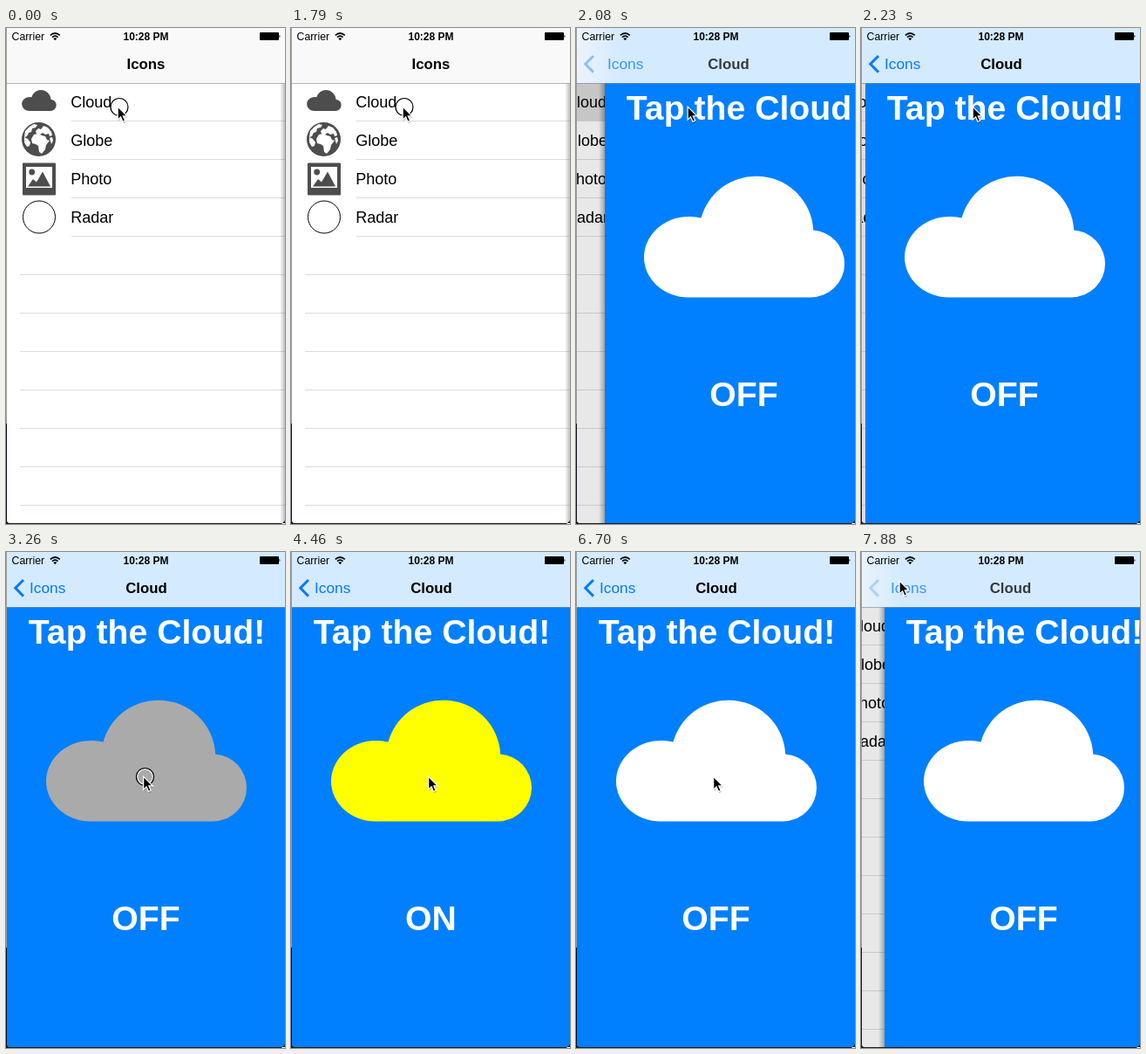
An HTML page that plays this animation: 320x568 px, repeating every 8 s.

```html
<!DOCTYPE html>
<html lang="en">
<head>
<meta charset="utf-8">
<title>Icons</title>
<style>
  html, body { margin: 0; width: 100%; height: 100%; overflow: hidden; background: #fff; }
  svg { display: block; width: 320px; height: 568px; }
  text { font-family: "Liberation Sans", Arial, sans-serif; }
  .row { font-size: 18px; }
  .bar { font-size: 17.3px; }
  .bold { font-size: 16.8px; font-weight: bold; }
  .big { font-size: 39.2px; font-weight: bold; fill: #fff; text-anchor: middle; }
</style>
</head>
<body>
<svg viewBox="0 0 320 568" xmlns="http://www.w3.org/2000/svg">
  <defs>
    <clipPath id="phone"><rect x="1" width="319" height="567"/></clipPath>
    <linearGradient id="tint" gradientUnits="userSpaceOnUse">
      <stop stop-color="#f9f9f9"/><stop offset="1" stop-color="#d4eaff"/>
    </linearGradient>
    <linearGradient id="shade">
      <stop stop-opacity="0"/><stop offset="1" stop-opacity=".3"/>
    </linearGradient>
    <path id="cloud" d="M97 308.500H237A39 38.500 0 0 0 276 270A39 38.500 0 0 0 240.200 231.500A65.300 65.300 0 0 0 175 169.700A65.300 65.300 0 0 0 111.500 217.500A52 46.500 0 0 0 46 262.500A51 46 0 0 0 97 308.500Z"/>
    <path id="arrow" d="M1 1V14.400L4.100 11.500L6.200 16.300L8.600 15.200L6.500 10.600H10.600Z"/>
  </defs>

  <g clip-path="url(#phone)">
    <rect width="320" height="568" fill="#fff"/>

    <g id="list">
      <rect id="mark" y="63" width="420" height="44" fill="#d9d9d9"/>
      <g id="lines" stroke="#dcdcde"/>
      <g id="names"></g>
      <g fill="#4d4d4d">
        <use href="#cloud" transform="translate(10.2 41.9) scale(.172)"/>
        <circle cx="37.5" cy="127.5" r="19.5"/>
        <path fill="#fff" d="M22 118l5-5 5-3 4 1-2 3-4 1-1 4-3 1-2 4-3 1zM34 118l3-3 3 1 3-4 5 2 4 5 1 4-3 1-1-3-4 1-3-2-3 2-4-1zM32 122l5-1 4 2 4 1 2 4 3 1-4 5-1 5-4 5-3-2-1-7-3-2-4-1-1-5zM21 125l4 2 3 4-1 4-3 1-3-5zM50 126l3-1 1 4-2 4z"/>
        <rect x="19" y="154.5" width="38" height="37" rx="1"/>
        <rect x="23" y="159" width="30" height="24" fill="#fff"/>
        <circle cx="29.7" cy="165" r="3.4"/>
        <path d="M25 181.5L31 173L35 176.5L42 164.5L51 181.5Z"/>
        <circle cx="38" cy="216.5" r="18.5" fill="#fff" stroke="#000"/>
      </g>
    </g>
    <rect id="dim" y="63" width="320" height="505"/>

    <g id="detail">
      <rect id="edge" x="-6" y="63" width="7" height="505" fill="url(#shade)"/>
      <rect x="1" y="63" width="330" height="505" fill="#007fff"/>
      <text class="big" x="161.5" y="105.2">Tap the Cloud!</text>
      <use id="button" href="#cloud"/>
      <text class="big" id="state" x="160.5" y="433"></text>
    </g>

    <rect width="320" height="63.5" fill="url(#tint)"/>
    <rect y="63" width="320" height="1" opacity=".28"/>
    <path id="chevron" d="M20 32L10.8 41.3L20 50.6" fill="none" stroke="#007aff" stroke-width="3"/>
    <text id="back" class="bar" y="47.3" fill="#007aff">Icons</text>
    <text id="home" class="bold" y="47.3">Icons</text>
    <text id="title" class="bold" y="47.3" text-anchor="middle">Cloud</text>

    <text x="6.5" y="13.5" font-size="12.3">Carrier</text>
    <path d="M50.8 8.3Q56.3 3.7 61.8 8.3M53 10.6Q56.3 7.8 59.6 10.6" fill="none" stroke="#000" stroke-width="1.7"/>
    <path d="M54.3 12.1Q56.3 10.6 58.3 12.1L56.3 14.3Z"/>
    <text x="160.5" y="13.5" font-size="12" font-weight="bold" text-anchor="middle">10:28 PM</text>
    <rect x="291" y="5" width="22" height="9" rx="1"/>
    <path d="M313.500 8q2 1.500 0 3z"/>
  </g>

  <rect width="1" height="453" fill="#999"/>
  <rect y="453" width="1" height="115" fill="#0a0a14"/>
  <path d="M0 567H320V568H0ZM0 564L4 568H0ZM320 564L316 568H320Z" fill="#1a1a1a"/>

  <g id="cursor">
    <g id="ring" fill="none">
      <circle cx="3" cy="1.5" r="8.9" stroke="#fff" stroke-width="1.4"/>
      <circle cx="3" cy="1.5" r="10" stroke="#000" stroke-width="1.2"/>
    </g>
    <g transform="scale(1.12)">
      <use href="#arrow" x=".6" y="1.500" opacity=".25"/>
      <use href="#arrow" stroke="#fff" stroke-width="1.1"/>
    </g>
  </g>
</svg>
<script>
const $ = id => document.getElementById(id);
const LOOP = 8000;
const PARALLAX = 0.3;

['Cloud', 'Globe', 'Photo', 'Radar'].forEach((name, i) => {
  $('names').innerHTML += `<text class="row" x="74.3" y="${91.2 + i * 44}">${name}</text>`;
});
for (let i = 0; i < 11; i++) {
  const y = 106.5 + i * 44;
  $('lines').innerHTML += `<path d="M${i < 4 ? 75 : 16} ${y}H420"/>`;
}

// x: detail offset; shift/fade: detail title; label: back label offset
const start = {
  x: 320, shift: 196, fade: 0, label: 111.5, home: 1, back: 0, chevron: 0,
  mark: 0, at: [127, 89], ring: 1, color: '#fff', state: 'OFF'
};
const settled = { shift: 0, fade: 1, label: 0, home: 0, back: 1, chevron: 1, mark: 0 };

// Each step lists only what changes
const steps = [
  [0, {}],
  [140, { ring: 0 }],
  [1790, { ring: 1 }],
  [1940, { x: 256, shift: 157, fade: .18, label: 96, home: .58, mark: 1, ring: 0 }],
  [2080, { x: 32, shift: 14, fade: .75, label: 9, home: 0, back: .75, chevron: .4 }],
  [2230, { x: 4, ...settled }],
  [2370, { x: 1 }],
  [2520, { x: 0, at: [130, 126] }],
  [2670, { at: [147, 227] }],
  [2820, { at: [156, 255] }],
  [2960, { at: [156.5, 256] }],
  [3260, { ring: 1, color: '#aaa' }],
  [4460, { ring: 0, color: '#ff0', state: 'ON' }],
  [5210, { ring: 1, color: '#ff8300' }],
  [6700, { ring: 0, color: '#fff', state: 'OFF' }],
  [7000, { at: [145, 241] }],
  [7140, { at: [111, 190] }],
  [7290, { at: [60, 86] }],
  [7440, { at: [48, 49] }],
  [7590, { at: [43, 32] }],
  [7740, { ring: 1, back: .25, chevron: .25 }],
  [7880, { x: 26, shift: 10.5, fade: .75, label: 7, back: .75, chevron: .25, ring: 0 }]
];

let last = start;
const poses = steps.map(([time, change]) => ({ time, pose: last = { ...last, ...change } }));

const set = (id, attrs) => {
  for (const key in attrs) $(id).setAttribute(key, attrs[key]);
};
const move = (id, x, y = 0) => set(id, { transform: `translate(${x} ${y})` });

function draw(p) {
  const progress = 1 - p.x / 320;
  move('list', -320 * PARALLAX * progress);
  move('detail', p.x);
  move('cursor', ...p.at);
  set('mark', { opacity: p.mark });
  set('dim', { opacity: 0.1 * progress });
  set('edge', { opacity: Math.min(1, p.x / 26) });
  set('tint', p.x < 320
    ? { x1: p.x - 60, x2: p.x + Math.min(p.x, 20) }
    : { x1: 400, x2: 460 });
  set('button', { fill: p.color });
  set('title', { x: 161 + p.shift, opacity: p.fade });
  set('back', { x: 27 + p.label, opacity: p.back });
  set('home', { x: 27 + p.label, opacity: p.home });
  set('chevron', { opacity: p.chevron });
  set('ring', { opacity: p.ring });
  $('state').textContent = p.state;
}

let shown;
function tick() {
  const now = performance.now() % LOOP;
  const pose = poses.findLast(s => s.time <= now).pose;
  if (pose !== shown) draw(shown = pose);
  requestAnimationFrame(tick);
}
tick();
</script>
</body>
</html>
```
